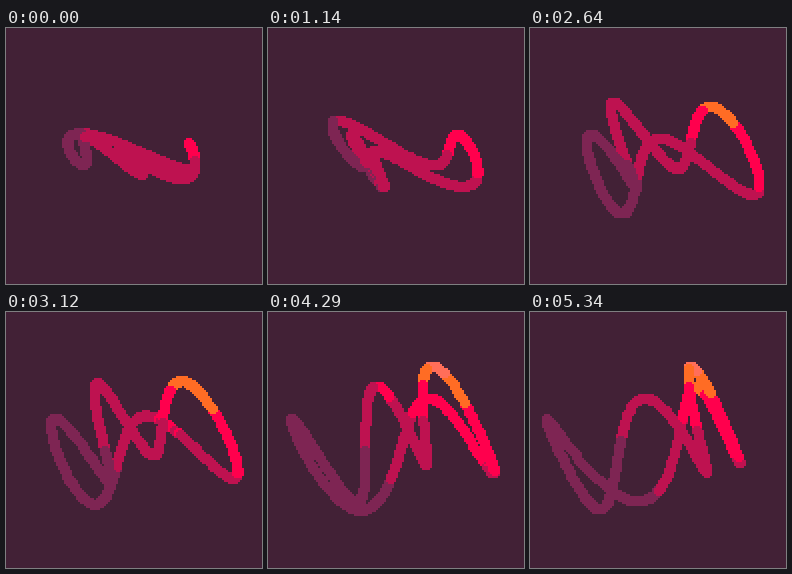
Animation of 256x256 px, one loop 5370 ms. Source, as an HTML page with a canvas:

```html
<!DOCTYPE html>
<html lang="en">
<head>
<meta charset="utf-8">
<title>Drifting loop</title>
<style>
  html, body { margin: 0; width: 100%; height: 100%; overflow: hidden; background: #422136; }
  canvas { display: block; width: 100vw; height: 100vh; image-rendering: pixelated; }
</style>
</head>
<body>
<canvas id="stage" width="128" height="128"></canvas>
<script>
const ctx = document.getElementById('stage').getContext('2d');
const STEP = 30, STEPS = 179, DOTS = 480;
const BACK = '#422136';
const RAMP = ['#7e2553', '#be1250', '#ff004d', '#ff6c24', '#ff6e59'];

const cos = deg => Math.cos(deg * Math.PI / 180);

// Starts at mid - depth and swings up to mid + depth after half a period
const swell = (mid, depth, period, t) => mid - depth * cos(360 * t / period);

// The colour follows the slope of the line from the top left corner
function dot(x, y) {
  ctx.fillStyle = RAMP[Math.min(RAMP.length - 1, Math.floor(x / y * 1.4))];
  ctx.fillRect(x - 1, y - 2, 3, 5);
  ctx.fillRect(x - 2, y - 1, 5, 3);
}

// Sum of waves around a closed loop; t in seconds
function draw(t) {
  const width = swell(32.8, 5.5, 10.4, t);
  const ripple = swell(16, 8, 9.4, t);
  const sway = 13.7 * cos(75 - 15.5 * t);
  const swayTurn = 116 - 24 * t;
  const foldTurn = 40 - 42 * t;

  ctx.fillStyle = BACK;
  ctx.fillRect(0, 0, 128, 128);
  for (let i = 0; i < DOTS; i++) {
    const u = 360 * i / DOTS;
    const x = width * cos(u - 160) + 12.2 * cos(2 * u - foldTurn) - 7.6 * cos(4 * u - 15);
    const y = sway * cos(u - swayTurn) - ripple * cos(4 * u);
    dot(Math.floor(64 + x), Math.floor(64 + y));
  }
}

const start = performance.now();
function tick() {
  const step = Math.floor((performance.now() - start) / STEP) % STEPS;
  draw(step * STEP / 1000);
  requestAnimationFrame(tick);
}
tick();
</script>
</body>
</html>
```
